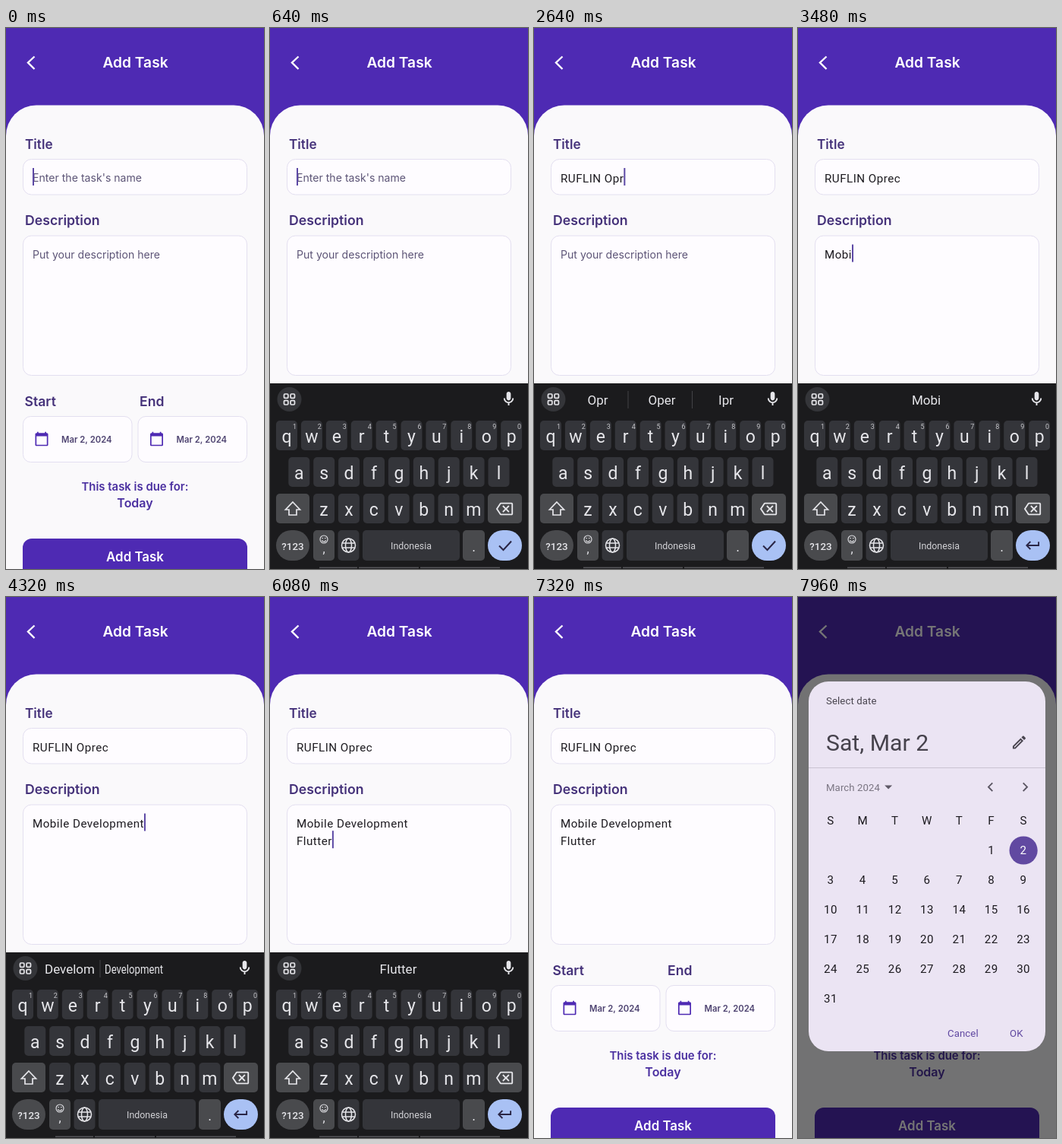
An HTML page with a canvas for the animation above (8000 ms loop, 340x711 px).

```html
<!DOCTYPE html>
<html lang="en">
<head>
<meta charset="utf-8">
<title>Add Task</title>
<style>
  html, body { margin: 0; width: 100%; height: 100%; overflow: hidden; background: #faf9fb; }
  canvas { display: block; width: 340px; height: 711px; }
</style>
</head>
<body>
<canvas id="stage"></canvas>
<script>
const W = 340, H = 711, LOOP = 8000;
const canvas = document.getElementById('stage');
const ctx = canvas.getContext('2d');
const dpr = window.devicePixelRatio || 1;
canvas.width = Math.round(W * dpr);
canvas.height = Math.round(H * dpr);

const UI = 'Inter, "Open Sans", sans-serif';
const BODY = 'Roboto, Arial, sans-serif';
const PURPLE = '#4e2ab3', LABEL = '#45327a', CARET = '#5c48a5', INK = '#1d1b20';

const ICONS = {
  calendar: 'M20 3h-1V1h-2v2H7V1H5v2H4c-1.1 0-2 .9-2 2v16c0 1.1.9 2 2 2h16c1.1 0 2-.9 2-2V5c0-1.1-.9-2-2-2zm0 18H4V8h16v13z',
  pencil: 'M14.06 9.02l.92.92L5.92 19H5v-.92l9.06-9.06M17.66 3c-.25 0-.51.1-.7.29l-1.83 1.83 3.75 3.75 1.83-1.83c.39-.39.39-1.02 0-1.41l-2.34-2.34c-.2-.2-.45-.29-.71-.29zm-3.6 3.19L3 17.25V21h3.75L17.81 9.94l-3.75-3.75z',
  mic: 'M12 14c1.66 0 3-1.34 3-3V5c0-1.66-1.34-3-3-3S9 3.34 9 5v6c0 1.66 1.34 3 3 3zm5-3c0 2.76-2.24 5-5 5s-5-2.24-5-5H5c0 3.53 2.61 6.43 6 6.92V21h2v-3.08c3.39-.49 6-3.39 6-6.92h-2z',
  erase: 'M22 3H7c-.69 0-1.23.35-1.59.88L0 12l5.41 8.11c.36.53.9.89 1.59.89h15c1.1 0 2-.9 2-2V5c0-1.1-.9-2-2-2zm0 16H7.07L2.4 12l4.66-7H22v14zm-11.59-2L14 13.41 17.59 17 19 15.59 15.41 12 19 8.41 17.59 7 14 10.59 10.41 7 9 8.41 12.59 12 9 15.59z',
  enter: 'M19 7v4H5.83l3.58-3.59L8 6l-6 6 6 6 1.41-1.41L5.83 13H21V7z'
};
for (const name in ICONS) ICONS[name] = new Path2D(ICONS[name]);

// Time helpers
const clamp = v => Math.max(0, Math.min(1, v));
const ease = (t, from, to) => {
  const p = clamp((t - from) / (to - from));
  return p * p * (3 - 2 * p);
};
const within = (t, from, to) => t >= from && t < to;

// Drawing helpers
function text(str, x, y, size, color, { font = UI, weight = 400, align = 'left', spacing = 0, room } = {}) {
  ctx.font = `${weight} ${size}px ${font}`;
  ctx.letterSpacing = spacing + 'px';
  ctx.textAlign = align;
  ctx.fillStyle = color;
  ctx.fillText(str, x, y, room);
  return ctx.measureText(str).width;
}

function box(x, y, w, h, r, fill, stroke) {
  ctx.beginPath();
  ctx.roundRect(x, y, w, h, r);
  if (fill) { ctx.fillStyle = fill; ctx.fill(); }
  if (stroke) { ctx.strokeStyle = stroke; ctx.lineWidth = 1; ctx.stroke(); }
}

function disc(x, y, r, fill) {
  ctx.beginPath();
  ctx.arc(x, y, r, 0, 7);
  ctx.fillStyle = fill;
  ctx.fill();
}

function line(points, color, width, close) {
  ctx.beginPath();
  points.forEach(([x, y]) => ctx.lineTo(x, y));
  if (close) ctx.closePath();
  ctx.strokeStyle = color;
  ctx.lineWidth = width;
  ctx.stroke();
}

function icon(name, x, y, scale, color) {
  ctx.save();
  ctx.translate(x - 12 * scale, y - 12 * scale);
  ctx.scale(scale, scale);
  ctx.fillStyle = color;
  ctx.fill(ICONS[name]);
  ctx.restore();
}

// Typing script: every edit is { at, field, value }
const edits = [{ at: 0, field: 'title', value: '' }];
function type(field, base, word, times) {
  times.forEach((at, i) => edits.push({ at, field, value: base + word.slice(0, i + 1) }));
}
const steps = (from, gap, n) => Array.from({ length: n }, (_, i) => from + i * gap);

type('title', '', 'RUFLIN', [1400, 1560, 1640, 1760, 1840, 1920]);
type('title', 'RUFLIN', ' Oprec', [2080, 2280, 2440, 2600, 2720, 2880]);
type('desc', '', '', []);
edits.push({ at: 3080, field: 'desc', value: '' });
type('desc', '', 'Mobile ', steps(3240, 75, 7));
type('desc', 'Mobile ', 'Develom', steps(3760, 70, 7));
edits.push({ at: 4260, field: 'desc', value: 'Mobile Development' });
type('desc', 'Mobile Development', '\nFlutter', [4440, 4560, 4680, 4880, 4960, 5040, 5200, 5360]);

const CHIPS = {
  R: ['R', 'Rumah', 'E'],
  Opr: ['Opr', 'Oper', 'Ipr'],
  Develom: ['Develom', 'Development'],
  Development: ['Develom', 'Development']
};
const CAPS = [[1040, 2340], [3140, 3260], [3700, 3780], [4480, 4580]];

function formAt(t) {
  const form = { title: '', desc: '', focus: 'title', last: 0 };
  for (const e of edits) {
    if (e.at > t) break;
    form[e.field] = e.value;
    form.focus = e.field;
    form.last = e.at;
  }
  return form;
}

function caret(x, y) {
  ctx.fillStyle = CARET;
  ctx.fillRect(x, y, 2, 23);
}

function field(value, hint, baseline, active) {
  const style = { font: BODY, spacing: 0.47 };
  let x = 35, y = baseline;
  if (!value) {
    text(hint, 35, y - 0.5, 14.1, '#5d5577');
  } else {
    value.split('\n').forEach((row, i) => {
      y = baseline + i * 22.7;
      x = 35 + text(row, 35, y, 15.2, INK, style);
    });
  }
  if (active) caret(x, y - 18.5);
}

function dateBox(x, label) {
  text(label, x + 2, 497, 17.6, LABEL, { weight: 600 });
  box(x, 510.5, 143.5, 60, 10, '#fefcff', '#e3dff0');
  icon('calendar', x + 24.5, 540, 0.85, PURPLE);
  text('Mar 2, 2024', x + 50.5, 545, 11.3, '#4d4270', { weight: 600 });
}

function drawPage(t, form) {
  ctx.fillStyle = PURPLE;
  ctx.fillRect(0, 0, W, 160);
  box(0, 101.5, W, H, [40, 40, 0, 0], '#faf9fb');
  line([[37.5, 37.5], [29, 45.5], [37.5, 54]], '#fff', 2.4);
  text('Add Task', 170.5, 52, 19.2, '#fff', { weight: 600, align: 'center' });

  const blink = (t - form.last) % 500 < 250;
  text('Title', 25, 159, 17.2, LABEL, { weight: 600 });
  box(22.5, 172.5, 295, 46.5, 11, '#fefcff', '#e3dff0');
  field(form.title, "Enter the task's name", 202.5, blink && form.focus === 'title');

  text('Description', 25, 259, 17.7, LABEL, { weight: 600 });
  box(22.5, 273, 295, 183.5, 11, '#fefcff', '#e3dff0');
  field(form.desc, 'Put your description here', 303, blink && form.focus === 'desc');

  dateBox(22.5, 'Start');
  dateBox(174, 'End');

  const due = { weight: 600, align: 'center' };
  text('This task is due for:', 170, 608, 14.9, '#4a2fa0', due);
  text('Today', 170, 629.5, 16, '#4a2fa0', due);
  box(22, 671, 296, 60, 12, PURPLE);
  text('Add Task', 170, 700.5, 16.9, '#fff', due);
}

// Keyboard
const KEY = '#34353a', SPECIAL = '#494a4d', GLYPH = '#e6e6ea';
const STEP = 32.9;

function keyRow(letters, firstX, y, hints) {
  [...letters].forEach((ch, i) => {
    const x = firstX + i * STEP;
    box(x - 14, y, 28, 39, 5, KEY);
    text(ch, x, y + 28.5, 23, GLYPH, { font: BODY, align: 'center' });
    if (hints) text(hints[i], x + 10.5, y + 11, 9, '#c6c6ca', { font: BODY, align: 'center' });
  });
}

function drawChips(form) {
  const word = form[form.focus].split(/\s/).pop();
  if (!word) return;
  const chips = CHIPS[word] || [word];
  const first = chips.length === 1 ? 169 : 84;
  chips.forEach((chip, i) => {
    const x = first + i * 84.5;
    text(chip, x, 495, 17, GLYPH, { font: BODY, align: 'center', room: 77 });
    if (i) line([[x - 44.5, 477], [x - 44.5, 500]], '#424246', 1);
  });
}

function drawGlobe(x, y) {
  ctx.strokeStyle = GLYPH;
  ctx.lineWidth = 1.5;
  for (const rx of [9, 4]) {
    ctx.beginPath();
    ctx.ellipse(x, y, rx, 9, 0, 0, 7);
    ctx.stroke();
  }
  for (const dy of [-3, 3]) line([[x - 8.4, y + dy], [x + 8.4, y + dy]], GLYPH, 1.5);
}

function drawSmile(x, y) {
  ctx.strokeStyle = GLYPH;
  ctx.lineWidth = 1.1;
  ctx.beginPath();
  ctx.arc(x, y, 5, 0, 7);
  ctx.stroke();
  ctx.beginPath();
  ctx.arc(x, y + 0.5, 2.6, 0.2, 2.94);
  ctx.stroke();
  disc(x - 1.8, y - 1.5, 0.8, GLYPH);
  disc(x + 1.8, y - 1.5, 0.8, GLYPH);
}

function drawShift(on) {
  box(8, 612, 44, 39, 5, on ? '#9b9b9d' : SPECIAL);
  const arrow = [[0, -9], [9.5, 1], [5, 1], [5, 8], [-5, 8], [-5, 1], [-9.5, 1]]
    .map(([x, y]) => [30 + x, 632 + y]);
  line(arrow, on ? '#fff' : GLYPH, 1.7, true);
  if (on) { ctx.fillStyle = '#fff'; ctx.fill(); }
}

function drawKeyboard(t, form) {
  const shown = ease(t, 160, 400) * (1 - ease(t, 6100, 6260));
  if (!shown) return;
  ctx.save();
  ctx.translate(0, (1 - shown) * 245);
  ctx.fillStyle = '#1b1b1d';
  ctx.fillRect(0, 467, W, 250);

  disc(25.5, 488, 16, '#343539');
  for (const dx of [-4.3, 4.3]) for (const dy of [-4.3, 4.3]) {
    ctx.strokeStyle = GLYPH;
    ctx.lineWidth = 1.7;
    ctx.beginPath();
    ctx.roundRect(25.5 + dx - 2.7, 488 + dy - 2.7, 5.4, 5.4, 1.2);
    ctx.stroke();
  }
  drawChips(form);
  icon('mic', 314.5, 487.5, 0.95, GLYPH);

  const caps = CAPS.some(([from, to]) => within(t, from, to));
  const set = s => caps ? s.toUpperCase() : s;
  keyRow(set('qwertyuiop'), 22, 516, '1234567890');
  keyRow(set('asdfghjkl'), 38.3, 564);
  keyRow(set('zxcvbnm'), 71, 612);

  drawShift(caps);
  box(287, 612, 45, 39, 5, SPECIAL);
  icon('erase', 309, 632, 0.93, GLYPH);

  box(8, 660, 44, 40, 20, SPECIAL);
  text('?123', 30, 685.5, 13.4, GLYPH, { font: BODY, weight: 500, align: 'center' });
  box(57, 660, 28, 40, 5, SPECIAL);
  drawSmile(71, 672);
  text(',', 71, 690, 16, GLYPH, { font: BODY, align: 'center' });
  box(89.5, 660, 28, 40, 5, KEY);
  drawGlobe(103.5, 680);
  box(122, 660, 128, 40, 5, KEY);
  text('Indonesia', 186, 685, 12.4, '#d2d2d6', { font: BODY, align: 'center' });
  box(254, 660, 29, 40, 5, SPECIAL);
  text('.', 268.5, 688, 18, GLYPH, { font: BODY, align: 'center' });
  box(287, 660, 45, 40, 20, '#a9c1f4');
  if (form.focus === 'title') line([[302, 680.5], [307.5, 686], [318, 674.5]], '#2a2646', 2);
  else icon('enter', 309.5, 680, 0.95, '#2a2646');

  for (const [x, w] of [[65, 50], [117, 79], [198, 105]]) {
    ctx.fillStyle = '#56565a';
    ctx.fillRect(x, 708.5, w, 1.5);
  }
  ctx.restore();
}

// Date picker
const MARCH = { name: 'March 2024', start: 5, days: 31, picked: 2 };
const FEBRUARY = { name: 'February 2024', start: 4, days: 29 };

function drawMonth(month, dx, lastDay) {
  const style = { font: BODY, align: 'center', spacing: 0.47 };
  const colX = c => 43 + dx + c * 42.35;
  [...'SMTWTFS'].forEach((d, c) => text(d, colX(c), 299, 15.1, INK, style));
  for (let day = 1; day <= month.days; day++) {
    const cell = month.start + day - 1;
    const x = colX(cell % 7), y = 333 + Math.floor(cell / 7) * 39;
    const picked = day === month.picked;
    if (picked) disc(x, y, 18.6, '#6149a1');
    const color = picked ? '#fff' : day > lastDay ? 'rgba(29,27,32,.38)' : INK;
    text(day, x, y + 5.3, 15.1, color, style);
  }
}

function drawPicker({ alpha, swipe, pressed, lastDay }) {
  if (!alpha) return;
  ctx.save();
  ctx.globalAlpha = alpha;
  ctx.fillStyle = 'rgba(0,0,0,.54)';
  ctx.fillRect(0, 0, W, H);
  box(14, 111, 312, 486, 26, '#ebe4f3');
  ctx.clip();

  const label = { font: BODY, spacing: 0.1 };
  text('Select date', 37, 140.5, 13.2, '#49454f', label);
  text('Sat, Mar 2', 37, 201.5, 30.2, '#46424c', { font: BODY });
  icon('pencil', 291.5, 191, 0.95, '#49454f');
  ctx.fillStyle = '#c9c3d1';
  ctx.fillRect(14, 224, 312, 1);

  const gray = '#7a7582', arrow = '#5a5562';
  const shown = swipe > 0.5 ? FEBRUARY : MARCH;
  const end = 37 + text(shown.name, 37, 254.5, 13.2, gray, label) + 11;
  ctx.beginPath();
  ctx.moveTo(end - 5, 247.5);
  ctx.lineTo(end + 5, 247.5);
  ctx.lineTo(end, 252.5);
  ctx.fillStyle = '#5f5a67';
  ctx.fill();

  if (pressed) disc(253.5, 249.5, 19, '#cfc8d7');
  line([[256.3, 244.3], [251, 249.7], [256.3, 255.1]], arrow, 1.9);
  const nextOff = shown === MARCH && lastDay < MARCH.days;
  line([[296.7, 244.3], [302, 249.7], [296.7, 255.1]], nextOff ? '#b5afbd' : arrow, 1.9);

  if (swipe < 1) drawMonth(MARCH, swipe * 312, lastDay);
  if (swipe > 0) drawMonth(FEBRUARY, swipe * 312 - 312, 29);

  text('Cancel', 197, 577.5, 13.2, '#6149a1', label);
  text('OK', 279, 577.5, 13.2, '#6149a1', label);
  ctx.restore();
}

function draw(t) {
  ctx.setTransform(dpr, 0, 0, dpr, 0, 0);
  const form = formAt(t);
  drawPage(t, form);
  drawKeyboard(t, form);
  drawPicker({
    alpha: ease(t, 6400, 6520) * (1 - ease(t, 7080, 7180)),
    swipe: ease(t, 6776, 6896),
    pressed: within(t, 6720, 6960),
    lastDay: 2
  });
  drawPicker({ alpha: ease(t, 7440, 7580), swipe: 0, pressed: false, lastDay: 31 });
}

const began = performance.now();
function tick() {
  draw((performance.now() - began) % LOOP);
  requestAnimationFrame(tick);
}
tick();
</script>
</body>
</html>
```
